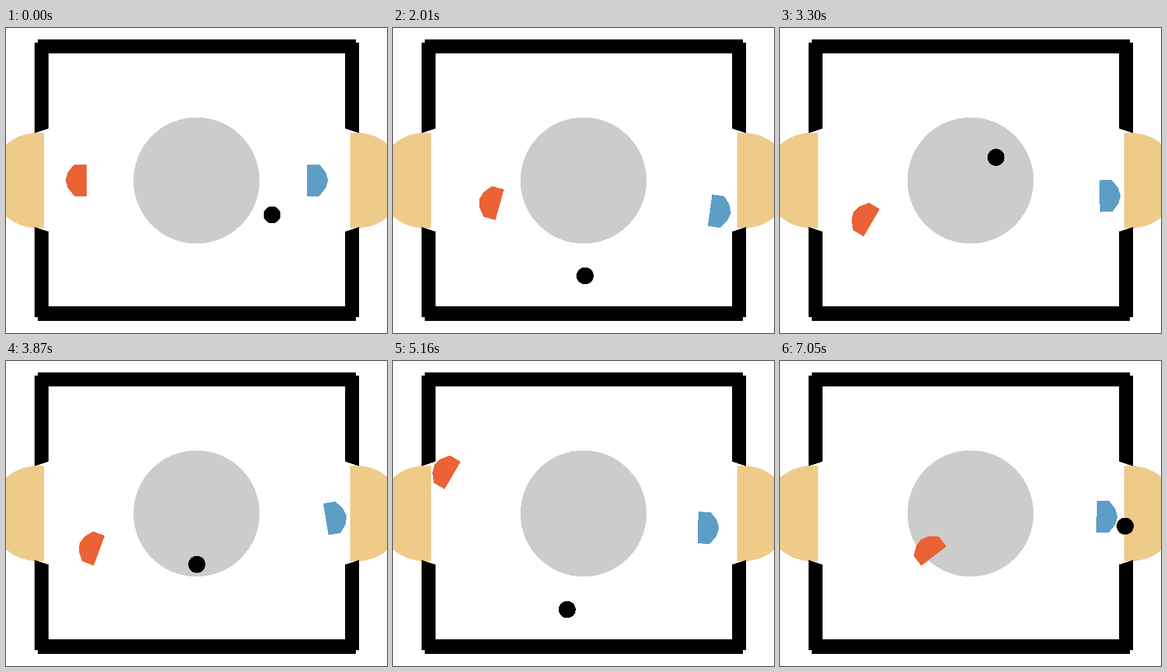
Write an HTML page that moves like this. It is 600 by 480 pixels and loops after 7.08 s.

```html
<!DOCTYPE html>
<html lang="en">
<head>
<meta charset="utf-8">
<title>Table hockey</title>
<style>
  html, body { margin: 0; width: 100%; height: 100%; overflow: hidden; background: #fff; }
  svg { display: block; width: 600px; height: 480px; }
</style>
</head>
<body>
<svg viewBox="0 0 600 480" shape-rendering="crispEdges">
  <defs>
    <g id="walls">
      <path d="M50 18H302V40H67V158L45 165.5V23H50Z"/>
      <path d="M50 461H302V438H67V320.5L45 313V455H50Z"/>
    </g>
    <path id="goal" d="M60 165H49.5A75 75 0 0 0 49.5 315H60Z" fill="#efcb8a"/>
    <path id="bat" d="M-12 -24H6V24H-12L-21.6 12L-25.2 0L-21.6 -12Z" stroke-width="2"/>
  </defs>
  <circle cx="300" cy="240" r="99.3" fill="#ccc"/>
  <use href="#goal"/>
  <use href="#goal" transform="translate(602 0) scale(-1 1)"/>
  <use href="#walls"/>
  <use href="#walls" transform="translate(601 0) scale(-1 1)"/>
  <use id="red" href="#bat" fill="#eb6235" stroke="#eb6235"/>
  <use id="blue" href="#bat" fill="#5d9ec7" stroke="#5d9ec7"/>
  <circle id="puck" r="13.4"/>
</svg>
<script>
const STEP = 30, FRAMES = 236;
const TOP = 54, BOTTOM = 424;

// Each hit sends the puck off; speeds are in pixels per step.
const hits = [
  { at: 0, x: 419, y: 294, vx: 0, vy: 0 },
  { at: 41, x: 419, y: 294, vx: -0.5, vy: -9.5 },
  { at: 43, x: 418, y: 275, vx: -27, vy: -1.6 },
  { at: 51, x: 200, y: 262, vx: 6.4, vy: 8 },
  { at: 89, x: 445, y: 285, vx: -7.6, vy: -18.7, dragX: 0.0433, dragY: 0.003 },
  { at: 216, x: 270, y: 286, vx: 14.4, vy: 15.9 }
];

// Main poses of the bats: step, x, y, angle.
const redPoses = [
  [0, 120, 239.5, 0], [43, 153.5, 188, -16.5], [51, 177, 255, 0],
  [92, 136.5, 309.5, 40], [129, 140.3, 296, 20.3], [172, 87.8, 176.5, 30.2],
  [200, 258, 242.5, 12.7], [214, 256, 268, 50], [235, 238, 301.5, 52.6]
];
const bluePoses = [
  [0, 481, 239.5, 0], [14, 507, 255, 4], [43, 436.5, 279, 16.5],
  [60, 505, 290, 8], [92, 510, 280, 7], [129, 510.6, 248, -9.5],
  [172, 487.3, 262.5, 1], [200, 498.3, 239, -13], [235, 505.5, 245, 1.2]
];

const byId = id => document.getElementById(id);
const puck = byId('puck'), red = byId('red'), blue = byId('blue');

// Distance covered after some steps when speed decays exponentially.
const glide = (speed, drag, steps) =>
  drag ? speed / drag * (1 - Math.exp(-drag * steps)) : speed * steps;

// Folds a straight path into bounces between the long walls.
function bounce(y) {
  const height = BOTTOM - TOP, period = 2 * height;
  const along = ((y - TOP) % period + period) % period;
  return TOP + height - Math.abs(along - height);
}

function puckAt(step) {
  const hit = hits.findLast(h => h.at <= step);
  const steps = step - hit.at;
  const x = hit.x + glide(hit.vx, hit.dragX, steps);
  const y = bounce(hit.y + glide(hit.vy, hit.dragY, steps));
  // The red bat traps the puck for a moment before its last shot.
  return step > 205 && step < 216 ? [x, Math.min(y, 286)] : [x, y];
}

function batAt(poses, step) {
  const next = Math.max(1, poses.findIndex(pose => pose[0] >= step));
  const from = poses[next - 1], to = poses[next];
  const part = (step - from[0]) / (to[0] - from[0]);
  return from.slice(1).map((value, i) => value + (to[i + 1] - value) * part);
}

function place(node, [x, y, angle = 0], facing = 1) {
  node.setAttribute('transform',
    `translate(${x} ${y}) rotate(${angle}) scale(${facing} 1)`);
}

function draw(time) {
  const step = Math.floor(time / STEP) % FRAMES;
  place(puck, puckAt(step));
  place(red, batAt(redPoses, step));
  place(blue, batAt(bluePoses, step), -1);
}

let start;
function tick(now) {
  start ??= now;
  draw(now - start);
  requestAnimationFrame(tick);
}
draw(0);
requestAnimationFrame(tick);
</script>
</body>
</html>
```
